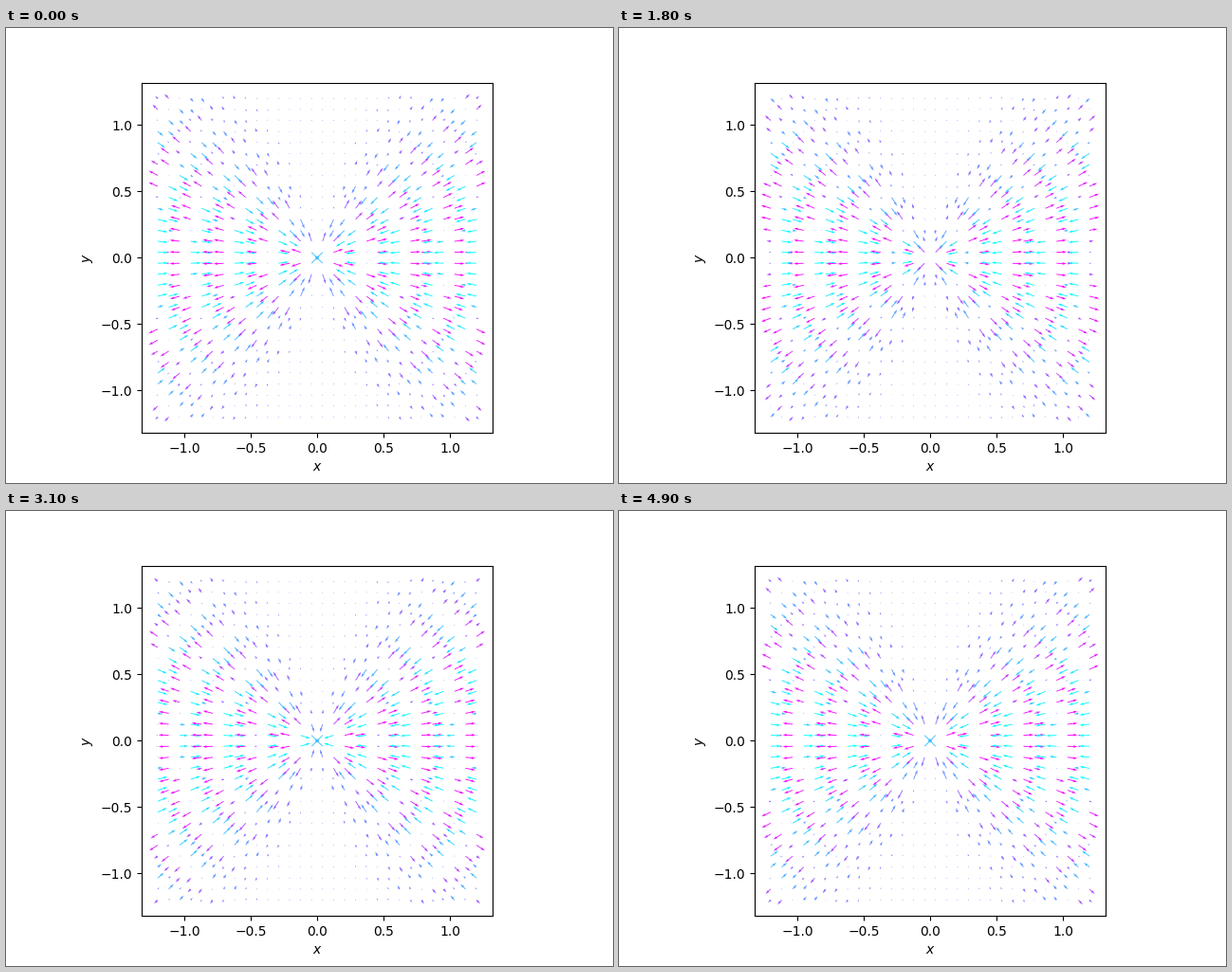
A matplotlib script that plays this animation: 640 px wide and 480 px high, repeating every 5000 ms.

```python
import numpy as np
import matplotlib.pyplot as plt
from matplotlib.animation import FuncAnimation

FRAMES = 50
CYCLES = 2
WAVELENGTH = 0.3
LIMIT = 0.45  # amplitude above which arrows stop growing

axis = np.linspace(-1.2, 1.2, 30)
x, y = np.meshgrid(axis, axis)
r = np.hypot(x, y)
cos_a, sin_a = x / r, y / r


def field(frame):
    """Signed radial strength of the outgoing wave, limited to [-1, 1]."""
    phase = 2 * np.pi * (r / WAVELENGTH - CYCLES * frame / (FRAMES - 1))
    strength = -np.cos(phase) * cos_a**2 / r
    return np.clip(strength / LIMIT, -1, 1)


def update(frame):
    s = field(frame)
    arrows.set_UVC(s * cos_a, s * sin_a, s * cos_a**2)
    return arrows,


fig, ax = plt.subplots(figsize=(6.4, 4.8), dpi=100)
ax.set_aspect("equal")
ax.set(xlim=(-1.32, 1.32), ylim=(-1.32, 1.32), xlabel="$x$", ylabel="$y$")
ticks = np.arange(-1, 1.1, 0.5)
ax.set_xticks(ticks)
ax.set_yticks(ticks)

start = field(0)
arrows = ax.quiver(x, y, start * cos_a, start * sin_a, start * cos_a**2,
                   cmap="cool", clim=(-1, 1), scale=34.6)

anim = FuncAnimation(fig, update, frames=FRAMES, interval=100,
                     repeat=True, repeat_delay=0)
plt.show()
```
